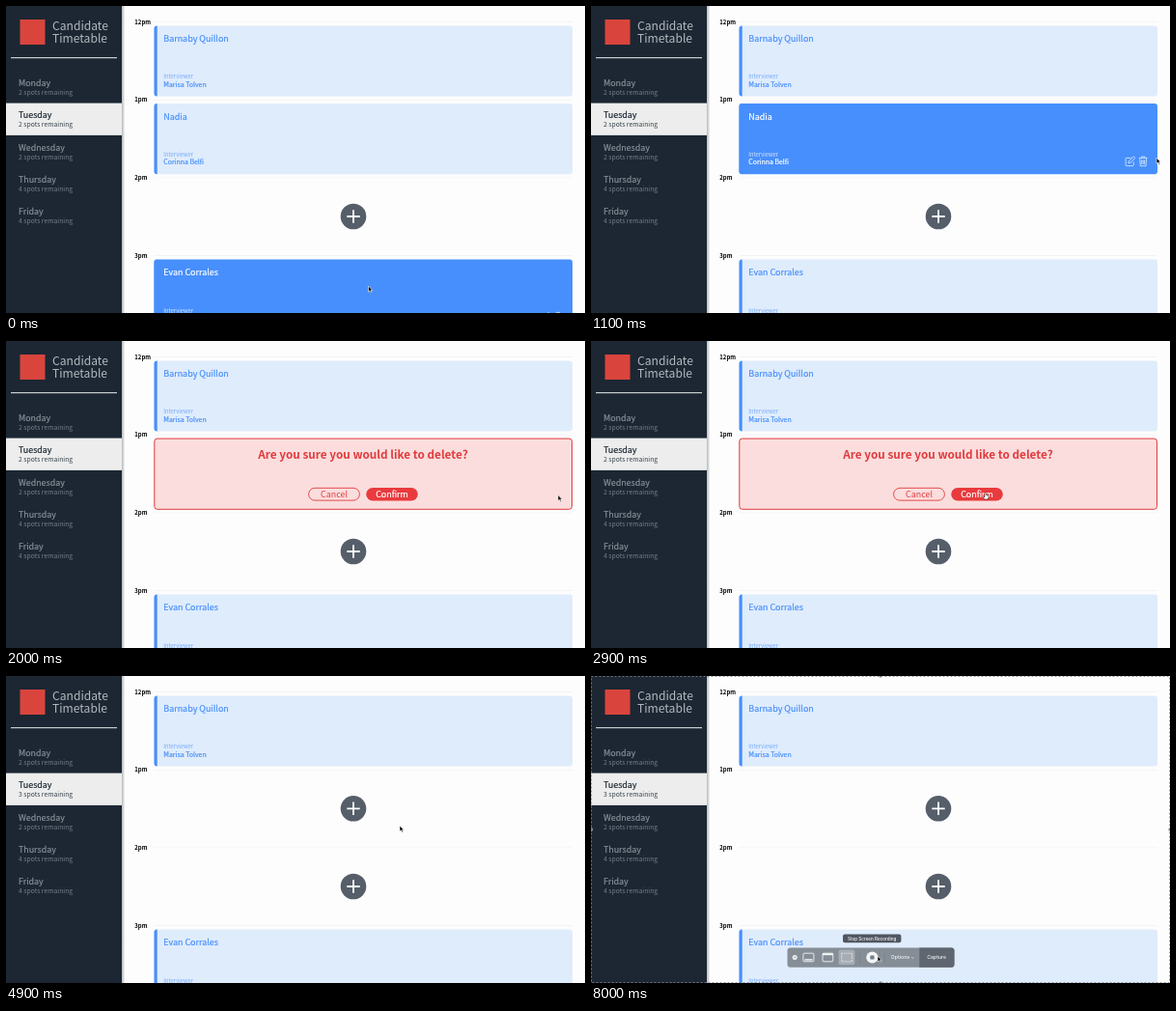
These frames come from a looping animation (600 by 318 pixels, 8.1 s). An HTML page:

```html
<!DOCTYPE html>
<html lang="en">
<head>
<meta charset="utf-8">
<title>Booking board</title>
<style>
html, body { margin: 0; width: 100%; height: 100%; overflow: hidden; background: #fdfdfd; }
svg { display: block; width: 100%; height: 100%; }
text { font-family: "Noto Sans CJK JP", "Noto Sans CJK SC", "Noto Sans CJK KR", sans-serif; white-space: pre; }
.ui text { font-family: Inter, sans-serif; font-weight: 500; }
</style>
</head>
<body>
<svg id="stage" viewBox="0 0 600 318"></svg>
<script>
const LOOP = 8100, STEP = 100;
const CONFIRM = 2000, DELETING = 3100, EMPTY = 4100, SELECT = 6400, TOOLBAR = 6900, TOOLTIP = 7800;
const BLUE = '#478ffc', DARK = '#1c2733', RED = '#e03b3e';
const CARD = { x: 153.5, w: 433.5, h: 73.2 };
const slotY = i => 20.4 + i * 80.7;

// cursor stops: time, x, y
const PATH = [
  [0, 375.5, 290], [1000, 586, 157.5], [1200, 586, 157], [1700, 572, 159.5], [2100, 572, 159.5],
  [2700, 408, 157], [3300, 408, 157], [3600, 408, 155], [6600, 408, 155], [7400, 297, 290]
];

const rect = (x, y, w, h, fill, more = '') =>
  `<rect x="${x}" y="${y}" width="${w}" height="${h}" fill="${fill}" ${more}/>`;
const circle = (x, y, r, fill, more = '') =>
  `<circle cx="${x}" cy="${y}" r="${r}" fill="${fill}" ${more}/>`;
const line = (d, color, width = 1, more = '') =>
  `<path d="${d}" fill="none" stroke="${color}" stroke-width="${width}" ${more}/>`;
const text = (s, x, y, size, fill, more = '') =>
  `<text x="${x}" y="${y}" font-size="${size}" fill="${fill}" ${more}>${s}</text>`;
const group = (x, y, body, more = '') => `<g transform="translate(${x} ${y})" ${more}>${body}</g>`;

const BOLD = 'font-weight="700"', MID = 'text-anchor="middle"';
// a hairline in the text colour gives a medium weight
const medium = color => `stroke="${color}" stroke-width=".2"`;

function cursorAt(t) {
  const i = PATH.findIndex(p => p[0] > t);
  if (i < 0) return PATH[PATH.length - 1].slice(1);
  const [t0, x0, y0] = PATH[i - 1], [t1, x1, y1] = PATH[i];
  const u = (t - t0) / (t1 - t0), e = u * u * (3 - 2 * u);
  return [x0 + (x1 - x0) * e, y0 + (y1 - y0) * e];
}

function sidebar(t) {
  const days = [['Monday', 2], ['Tuesday', t < EMPTY ? 2 : 3], ['Wednesday', 2], ['Thursday', 4], ['Friday', 4]];
  return rect(120, 0, 3.5, 318, 'url(#edge)') + rect(0, 0, 120, 318, DARK) +
    rect(14.5, 14, 26, 26, '#d9453d') +
    text('Candidate', 48, 25.4, 12.1, '#b4bac0', 'font-weight="300"') +
    text('Timetable', 48, 37.6, 12.1, '#b4bac0', 'font-weight="300"') +
    rect(5, 53, 110, 1.2, '#c9cdd1') +
    rect(0, 100.6, 120, 33.3, '#ecedec') +
    days.map(([day, spots], i) => {
      const y = 83.1 + i * 33.27, on = i === 1, ink = on ? DARK : '#868f98';
      return text(day, 13, y, 8.9, ink, medium(ink)) +
        text(`${spots} spots remaining`, 13, y + 9.1, 6.8, on ? '#39434e' : '#757e88');
    }).join('');
}

function icons(y) {
  return group(553.5, y + 54.3,
    line('M6 2H1.4Q.6 2 .6 2.8V9.4Q.6 10.2 1.4 10.2H8Q8.8 10.2 8.8 9.4V6M3.4 7.4L3.8 5.4 8.8 .5 10.4 2.1 5.4 7Z', '#fff', .8) +
    line('M14.3 2H23M17 1.8V.6H20.3V1.8M15.2 2.2L15.8 10.3H21.5L22.1 2.2M17.2 4V8.5M18.65 4V8.5M20.1 4V8.5', '#fff', .8),
    'opacity=".85"');
}

function booking(i, student, host, hover) {
  const y = slotY(i), { x, w, h } = CARD, ink = hover ? '#fff' : BLUE;
  return rect(x, y, w, h, hover ? BLUE : '#dfecfc', 'rx="3"') +
    `<path d="M${x + 3.2} ${y}h-.2a3 3 0 0 0-3 3v${h - 6}a3 3 0 0 0 3 3h.2z" fill="${BLUE}"/>` +
    text(student, 163.3, y + 16.9, 8.95, ink, medium(ink)) +
    text('Interviewer', 163.3, y + 55, 5.75, hover ? '#d6e6ff' : '#74aafa') +
    text(host, 163.3, y + 63.3, 6.95, ink, medium(ink)) +
    (hover ? icons(y) : '');
}

const addButton = i => group(360, slotY(i) + 36.2,
  circle(0, 0, 13.3, '#555e69') + line('M-6.7 0H6.7M0 -6.7V6.7', '#fff', 1.8));

function confirmCard(y) {
  return rect(CARD.x + .3, y, CARD.w - .8, CARD.h, '#fbdddd', `rx="3" stroke="${RED}" stroke-width="1"`) +
    text('Are you sure you would like to delete?', 370, y + 20.6, 11.75, RED, `${BOLD} ${MID}`) +
    rect(313.6, y + 51.2, 52.8, 12.8, 'none', `rx="6.4" stroke="${RED}" stroke-width=".9"`) +
    text('Cancel', 340, y + 60.8, 8.9, RED, MID) +
    rect(373.2, y + 50.8, 53.6, 13.6, '#e93a3d', 'rx="6.8"') +
    text('Confirm', 400, y + 60.8, 8.95, '#fff', `${MID} ${medium('#fff')}`);
}

function deletingCard(y, t) {
  const spin = 67 + (t - 3900) * .36;
  return rect(CARD.x, y, CARD.w, CARD.h, DARK, 'rx="3"') +
    group(339.2, y + 36.3,
      circle(0, 0, 9.3, 'none', 'stroke="#47505a" stroke-width="1.8"') +
      line('M9.3 0A9.3 9.3 0 0 1 0 9.3', '#fff', 1.8, `transform="rotate(${spin})"`)) +
    text('Deleting', 362.8, y + 41.1, 11.75, '#fff', BOLD);
}

function board(t, [cx, cy]) {
  const over = i => t < SELECT && cx > CARD.x && cx < 587 && cy > slotY(i) && cy < slotY(i) + CARD.h;
  const y = slotY(1);
  const second = t < CONFIRM ? booking(1, 'Nadia', 'Corinna Belfi', over(1))
    : t < DELETING ? confirmCard(y)
    : t < EMPTY ? deletingCard(y, t) : addButton(1);
  return ['12pm', '1pm', '2pm', '3pm'].map((hour, i) =>
      text(hour, 133.3, 18.7 + i * 80.75, 6, '#000', BOLD) +
      rect(153.5, 16.2 + i * 80.7, 433.5, .6, '#efefef')).join('') +
    booking(0, 'Barnaby Quillon', 'Marisa Tolven', over(0)) + second + addButton(2) +
    booking(3, 'Evan Corrales', 'Tobias Renwick', over(3));
}

function selection() {
  const handles = [[300, 0], [0, 159], [600, 159], [300, 318]];
  return rect(.5, .5, 599, 317, 'none', 'stroke="#858a90" stroke-width=".8" stroke-dasharray="2 2"') +
    handles.map(([x, y]) => circle(x, y, 1.7, '#777d84', 'stroke="#ddd" stroke-width=".4"')).join('');
}

function toolbar(t) {
  const white = '#f4f5f6';
  return `<g class="ui" opacity="${Math.min(1, (t - TOOLBAR + STEP) / 400)}">` +
    rect(203.5, 281.4, 173, 20.3, '#858d96', 'rx="3"') +
    `<path d="M340.3 281.4H373.5Q376.5 281.4 376.5 284.4V298.7Q376.5 301.7 373.5 301.7H340.3Z" fill="#5f6670"/>` +
    circle(211.2, 291.5, 2.5, white) + line('M210.3 290.6L212.1 292.4M212.1 290.6L210.3 292.4', '#757d86', .6) +
    rect(219.9, 287.2, 11, 8.6, 'none', `rx="1" stroke="${white}" stroke-width=".9"`) + rect(221.4, 293.2, 8, 1.4, white) +
    rect(240, 287.2, 10.8, 8.6, 'none', `rx="1" stroke="${white}" stroke-width=".9"`) + rect(240, 287.2, 10.8, 2, white) +
    rect(256.6, 283.6, 16.8, 15.6, '#a6acb3', 'rx="2"') +
    rect(259.7, 287.2, 10.8, 8.6, 'none', `stroke="${white}" stroke-width=".8" stroke-dasharray="1.3 .9"`) +
    rect(278, 284.5, .5, 14, '#737b84') + rect(304.3, 284.5, .5, 14, '#737b84') +
    circle(291.4, 291.5, 6.1, white) + rect(289.3, 289.4, 4.2, 4.2, '#747c85', 'rx=".5"') +
    text('Options', 310.8, 293.4, 5.2, white) + line('M332 291.2L333.3 292.5 334.6 291.2', white, .6) +
    text('Capture', 358.2, 293.4, 5.2, white, MID) + '</g>' +
    (t < TOOLTIP ? '' : `<g class="ui">${rect(261, 267.6, 60.4, 8.6, '#50565f', 'rx="2"')}` +
      text('Stop Screen Recording', 291.2, 273.6, 4.6, '#fff', MID) + '</g>');
}

function cursor(t, [x, y]) {
  const shape = (d, fill, stroke, width = .6) =>
    `<path d="${d}" fill="${fill}" stroke="${stroke}" stroke-width="${width}" stroke-linejoin="round"/>`;
  const pointing = (t >= 1500 && t < CONFIRM) || (t >= 2600 && t < DELETING);
  const gripping = t >= SELECT && t < 6600;
  return group(x, y,
    pointing ? shape('M-.1 .6Q.7 -.5 1.5 .6V2.5L4 3.1V5.2L3.2 7H-.2L-2 4.5-1.3 3.9-.1 4.8Z', '#fff', '#222')
    : gripping ? shape('M-2 .6Q-1-1.3 .2-1.2 2.6-1.5 2.9 .8V2.8Q2.4 4.4 1.2 4.4H-.6Q-2.6 3.2-2 .6Z', '#fff', '#222', .9) +
      line('M-.6 .3V1.6M.7 .2V1.6M1.8 .4V1.6', '#333', .5)
    : shape('M0 0V6L1.4 4.8 2.4 6.9 3.4 6.4 2.5 4.4H4.3Z', '#000', '#fff'));
}

const EDGE = `<defs><linearGradient id="edge"><stop stop-color="#b5b8bb"/>
  <stop offset="1" stop-color="#fdfdfd"/></linearGradient></defs>`;

function scene(t) {
  const at = cursorAt(t);
  return EDGE + rect(0, 0, 600, 318, '#fdfdfd') + board(t, at) + sidebar(t) +
    (t >= SELECT ? selection() : '') + (t >= TOOLBAR ? toolbar(t) : '') + cursor(t, at);
}

const stage = document.getElementById('stage');
const start = performance.now();
let shown = -1;

function draw(now) {
  const t = Math.floor((Math.max(0, now - start) % LOOP) / STEP) * STEP;
  if (t !== shown) stage.innerHTML = scene(shown = t);
  requestAnimationFrame(draw);
}
draw(start);
</script>
</body>
</html>
```
